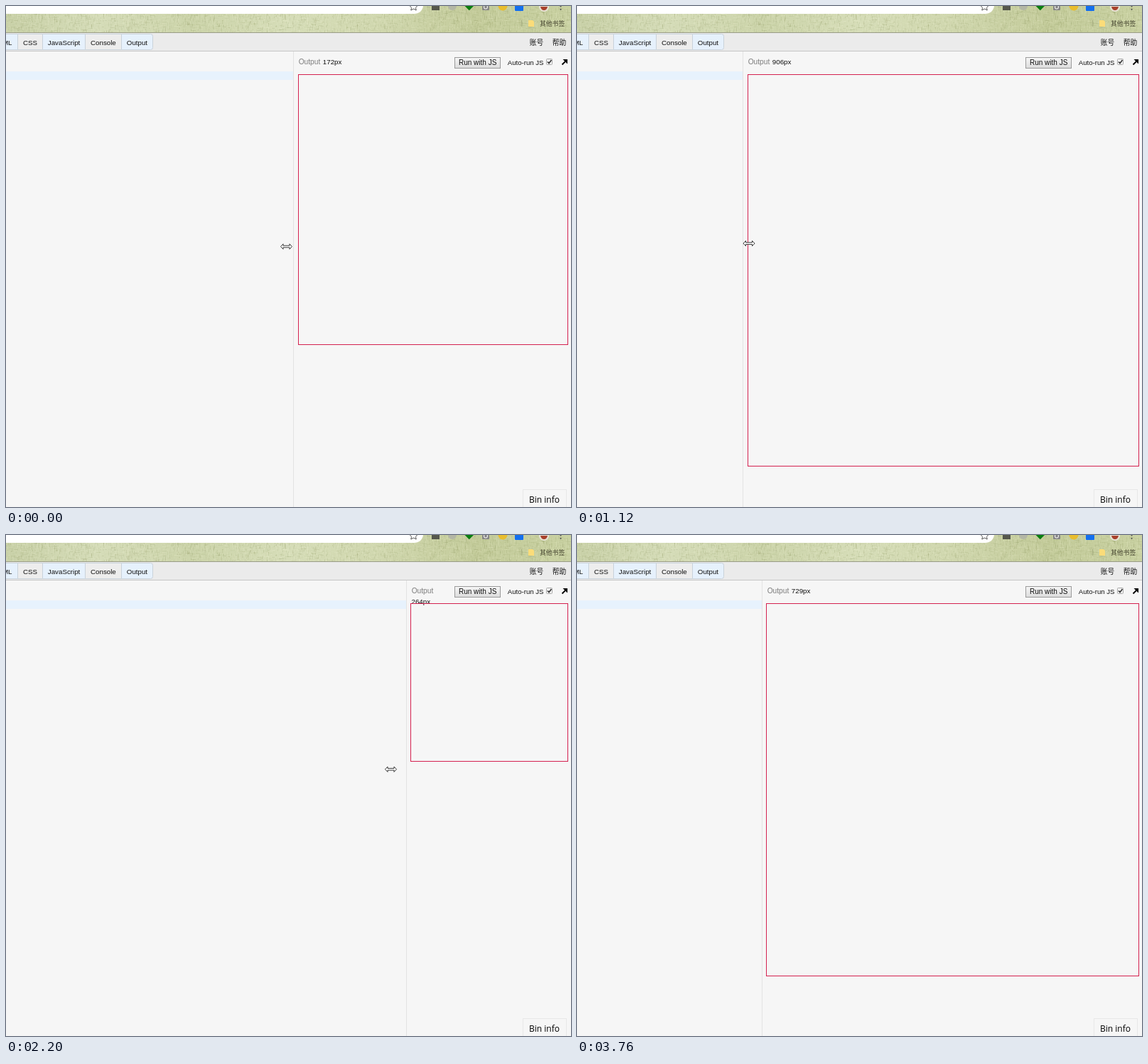
Animation, 795 px wide and 705 px high, one loop 4.32 s. Source, as an HTML page with a canvas:

```html
<!DOCTYPE html>
<html lang="zh">
<head>
<meta charset="utf-8">
<style>
  html, body { margin: 0; width: 100%; height: 100%; overflow: hidden; background: #f6f6f6; }
  canvas, svg { position: absolute; left: 0; top: 0; display: block; }
  text { font: 9.75px "Liberation Sans", Arial, sans-serif; fill: #111; }
  .cjk { font-family: "Noto Sans CJK SC", "Noto Sans CJK", sans-serif; }
  .info { font-family: "Open Sans", "Noto Sans", sans-serif; fill: #000; }
</style>
</head>
<body>
<canvas id="linen" width="795" height="38"></canvas>
<svg width="795" height="705" viewBox="0 0 795 705">
  <defs>
    <linearGradient id="buttonFill" x2="0" y2="1">
      <stop stop-color="#f6f6f6"/><stop offset="1" stop-color="#dcdcdc"/>
    </linearGradient>
  </defs>

  <!-- browser chrome -->
  <path d="M0 0H587C586 7 581 11 574 11H0Z" fill="#fff"/>
  <path d="M568.5 0l2 2.5l-.7 3.5l3.7-2l3.7 2l-.7-3.5l2-2.5" fill="none" stroke="#555"/>
  <rect x="599" width="11" height="6" fill="#55574c"/>
  <circle cx="628" r="6" fill="#b3b6a5"/>
  <path d="M645.5 0H658L651.75 6.25Z" fill="#087d10"/>
  <rect x="670" width="10" height="6" rx="1" fill="#858585"/>
  <circle cx="675" cy="1.5" r="2.5" fill="none" stroke="#eee" stroke-width="1.2"/>
  <circle cx="699" r="6.5" fill="#e9bd2d"/>
  <rect x="716" y="-5" width="12" height="12" rx="1" fill="#146fee"/>
  <circle cx="757" cy="1" r="7" fill="#e7e2d5"/>
  <path d="M752 1h10q-1 5-5 5t-5-5" fill="#a8402c"/>
  <circle cx="780.5" cy="0.5" r="1.1" fill="#555"/>
  <circle cx="780.5" cy="4.8" r="1.1" fill="#555"/>
  <path d="M725.5 20v9" stroke="#aab184"/>
  <path d="M735 20h6l2 2v7h-8z" fill="#fbdc79"/>
  <text class="cjk" x="751" y="28" style="font-size:8.8px;fill:#45442f">其他书签</text>

  <!-- toolbar -->
  <rect y="38" width="795" height="26" fill="#ebebeb"/>
  <path d="M0 37.5H795" stroke="#9a9d88"/>
  <path d="M0 63.5H795" stroke="#c6c6c6"/>
  <path d="M-1 39.5H203.5q3 0 3 3V58.5q0 3-3 3H-1Z" fill="#e6f1fc" stroke="#c9d2da"/>
  <path d="M16.5 39.5h35v22h-35zM111.5 39.5h51v22h-51z" fill="#ededed" stroke="#c9d2da"/>
  <text x="8.5" y="54.5" text-anchor="end">HTML</text>
  <text x="24" y="54.5">CSS</text>
  <text x="58.8" y="54.5">JavaScript</text>
  <text x="119" y="54.5">Console</text>
  <text x="169.8" y="54.5">Output</text>
  <text class="cjk" x="736.8" y="55">账号</text>
  <text class="cjk" x="768.8" y="55">帮助</text>

  <!-- resizable panels -->
  <rect id="activeLine" y="92" height="12" fill="#e7f2fd"/>
  <rect id="divider" y="64" width="1" height="641" fill="#e3e3e3"/>
  <text id="label" y="82" style="font-size:10.2px;fill:#7c7c7c">Output</text>
  <text id="size"></text>
  <rect x="631.5" y="72.5" width="64" height="15" fill="url(#buttonFill)" stroke="#9b9b9b"/>
  <text x="637" y="83.3" style="font-size:10px">Run with JS</text>
  <text x="705.8" y="83.3" style="font-size:9.6px">Auto-run JS</text>
  <rect x="760.5" y="74.5" width="8" height="8" rx="1" fill="#f1f1f1" stroke="#aaa"/>
  <path d="M762 78.5l2 2L767.5 76" fill="none" stroke="#333" stroke-width="1.6"/>
  <path d="M782.5 82.5L787 78" stroke="#000" stroke-width="1.8"/>
  <path d="M783.5 75H790V81.5Z"/>
  <rect id="square" y="96.5" fill="none" stroke="#d4214f"/>
  <g id="scrollbar">
    <rect x="784" y="91" width="11" height="614" fill="#f1f1f1"/>
    <rect x="785" y="104" width="8" height="588" fill="#c1c1c1"/>
  </g>

  <rect x="727.5" y="680.5" width="61" height="40" fill="#f6f6f6" stroke="#e8e8e8"/>
  <text class="info" x="736" y="699" style="font-size:12px">Bin info</text>
  <text class="info" x="737" y="712.5" style="font-size:9.5px">just now</text>

  <g id="pointer" fill="#fff" stroke="#222" stroke-width="0.9">
    <path id="resizer" d="M-8 0l3.5-3.7v2.4h9v-2.4L8 0l-3.5 3.7v-2.4h-9v2.4Z"/>
    <path id="arrow" d="M.5 .5v16l3.7-3.5l2.6 5.5l2.4-1l-2.5-5.500h4.800Z"/>
  </g>
</svg>

<script>
const LOOP = 4320;
const TURN = 2200, TURN_STEP = 16;   // the picture refreshes a little faster after the turn
const RELEASE = 23, LEAVE = 28;      // steps: drag ends, pointer leaves the stage

const byId = id => document.getElementById(id);
const set = (id, attrs) => {
  for (const key in attrs) byId(id).setAttribute(key, attrs[key]);
};
const show = (id, visible) => set(id, { visibility: visible ? "visible" : "hidden" });

// step, divider x, pointer x
const drag = [
  [0, 404.4, 394.5], [2, 308, 296.5], [3, 211.3, 199], [6, 132, 129.5],
  [8, 233.3, 242], [10, 370, 376.5], [12, 447.3, 450.5], [15, 596, 592],
  [16, 562.6, 541.5], [19, 328.3, 323], [22, 260, 259.5]
];
// step, pointer x, pointer y
const exit = [[22, 260, 329.5], [24, 782, 562], [27, 754, 690]];
const sizes = [[0, "172px"], [7, "906px"], [15, "264px"], [22, "729px"]];

const stepAt = t => Math.floor(t < TURN ? t / 137.5 : TURN_STEP + (t - TURN) / 130);

// smooth curve through the keys, read from one column
function follow(keys, step, column) {
  const last = keys.length - 1;
  const s = Math.min(step, keys[last][0]);
  const i = Math.max(1, keys.findIndex(key => key[0] >= s));
  const slope = k => {
    const before = keys[Math.max(k - 1, 0)], after = keys[Math.min(k + 1, last)];
    return (after[column] - before[column]) / (after[0] - before[0]);
  };
  const a = keys[i - 1], b = keys[i];
  const span = b[0] - a[0], u = (s - a[0]) / span, v = 1 - u;
  return a[column] * v * v * (1 + 2 * u) + b[column] * u * u * (1 + 2 * v)
    + span * u * v * (slope(i - 1) * v - slope(i) * u);
}

function paintLinen() {
  const ctx = byId("linen").getContext("2d");
  const base = ctx.createLinearGradient(0, 0, 795, 0);
  ["#c9d1a8", "#d5dcb8", "#ccd4aa", "#d6ddb8", "#d0d7ae", "#c3cb9a", "#c9d1a2"]
    .forEach((color, i, all) => base.addColorStop(i / (all.length - 1), color));
  ctx.fillStyle = base;
  ctx.fillRect(0, 0, 795, 38);
  let seed = 7;
  const random = () => (seed = seed * 16807 % 2147483647) / 2147483647;
  for (let i = 0; i < 6000; i++) {
    const tone = random() < 0.5 ? "255,255,225" : "110,122,62";
    ctx.fillStyle = `rgba(${tone},${random() * 0.13})`;
    const x = Math.floor(random() * 795), y = Math.floor(random() * 38);
    const length = 2 + Math.floor(random() * 6);
    if (i % 3) ctx.fillRect(x, y, 1, length);
    else ctx.fillRect(x, y, length, 1);
  }
}

function render(t) {
  const step = stepAt(t);
  const split = follow(drag, step, 1);
  const line = Math.round(split);
  const wrapped = split > 560;
  const scrolling = split < 151;     // the square no longer fits the panel
  const edge = split + 6.4;
  const left = Math.round(edge);
  const right = scrolling ? 779 : 791;
  const bottom = Math.round(right + 96.5 - edge);

  set("activeLine", { width: line });
  set("divider", { x: line });
  set("label", { x: line + 7.7 });
  set("size", { x: line + (wrapped ? 7.5 : 41.8), y: wrapped ? 96.5 : 82 });
  byId("size").textContent = sizes.findLast(entry => entry[0] <= step)[1];
  set("square", { x: left + 0.5, width: right - left - 1, height: bottom - 97 });
  show("scrollbar", scrolling);

  const released = step >= RELEASE;
  const x = released ? follow(exit, step, 1) : follow(drag, step, 2);
  const y = released ? follow(exit, step, 2) : 338.5 - 0.55 * Math.min(step, TURN_STEP);
  set("pointer", { transform: `translate(${x} ${y})` });
  show("resizer", !released);
  show("arrow", released && step < LEAVE);
}

function tick() {
  render(performance.now() % LOOP);
  requestAnimationFrame(tick);
}

paintLinen();
tick();
</script>
</body>
</html>
```
